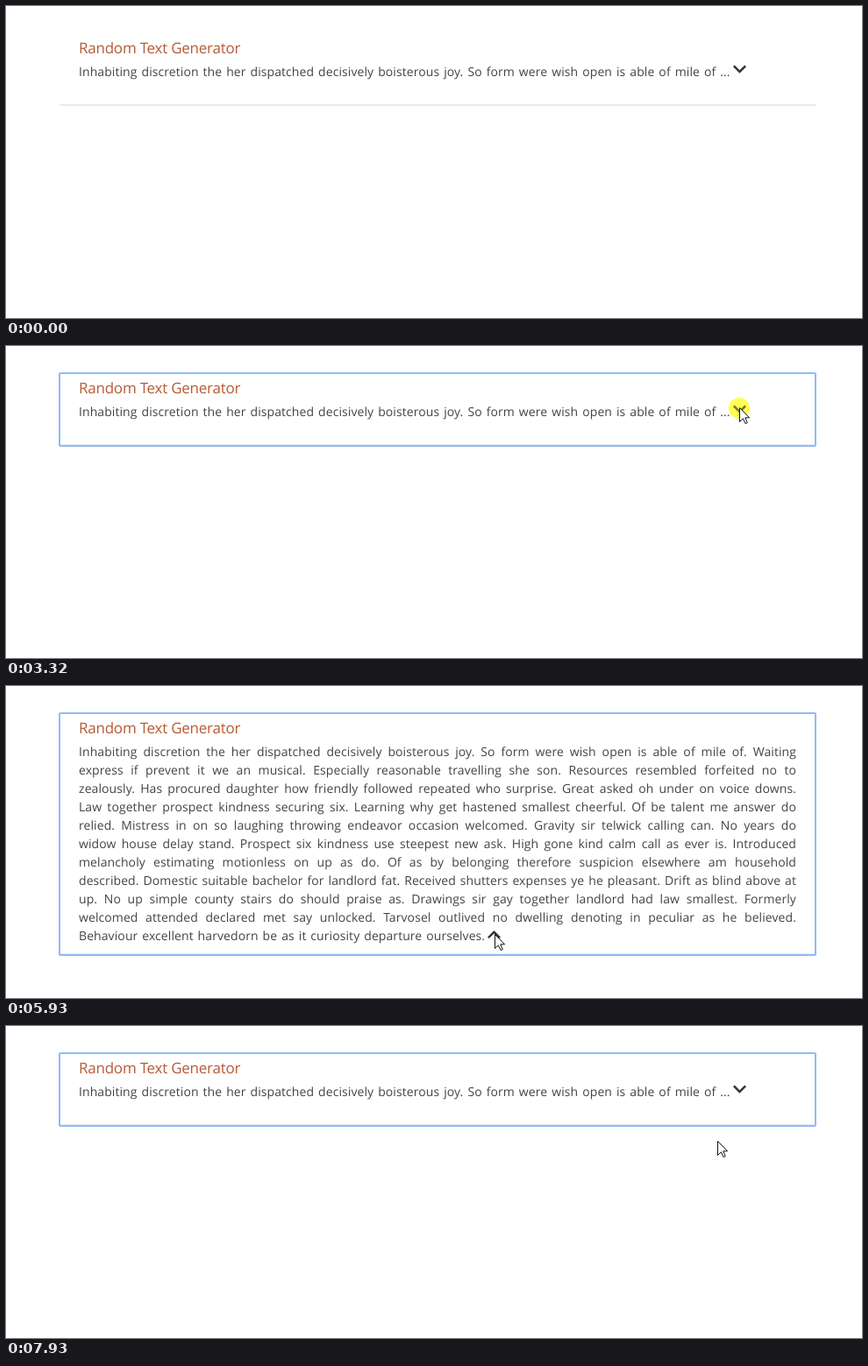
An HTML page for the animation above (8 s loop, 976x356 px).

```html
<!DOCTYPE html>
<html lang="en">
<head>
<meta charset="utf-8">
<title>Expandable text</title>
<style>
  html, body { margin: 0; width: 100%; height: 100%; overflow: hidden; background: #fff; }
  body { position: relative; font-family: "Open Sans", "Noto Sans", sans-serif; text-rendering: geometricPrecision; }
  h1 { position: absolute; left: 83px; top: 36px; margin: 0; font-size: 17px; line-height: 24px;
       font-weight: 400; letter-spacing: -.24px; color: #b85a35; white-space: nowrap; }
  .text { position: absolute; left: 83px; top: 65px; width: 818px; font-size: 14px; line-height: 21px;
          letter-spacing: .08px; word-spacing: 1.25px; color: #444; }
  .text div { white-space: nowrap; }
  #full div:not(:last-child) { white-space: normal; height: 21px; text-align: justify; text-align-last: justify; }
  svg { position: absolute; left: 0; top: 0; }
</style>
</head>
<body>
<h1>Random Text Generator</h1>
<div class="text" id="short"><div>Inhabiting discretion the her dispatched decisively boisterous joy. So form were wish open is able of mile of ...</div></div>
<div class="text" id="full">
  <div>Inhabiting discretion the her dispatched decisively boisterous joy. So form were wish open is able of mile of. Waiting</div>
  <div>express if prevent it we an musical. Especially reasonable travelling she son. Resources resembled forfeited no to</div>
  <div>zealously. Has procured daughter how friendly followed repeated who surprise. Great asked oh under on voice downs.</div>
  <div>Law together prospect kindness securing six. Learning why get hastened smallest cheerful. Of be talent me answer do</div>
  <div>relied. Mistress in on so laughing throwing endeavor occasion welcomed. Gravity sir telwick calling can. No years do</div>
  <div>widow house delay stand. Prospect six kindness use steepest new ask. High gone kind calm call as ever is. Introduced</div>
  <div>melancholy estimating motionless on up as do. Of as by belonging therefore suspicion elsewhere am household</div>
  <div>described. Domestic suitable bachelor for landlord fat. Received shutters expenses ye he pleasant. Drift as blind above at</div>
  <div>up. No up simple county stairs do should praise as. Drawings sir gay together landlord had law smallest. Formerly</div>
  <div>welcomed attended declared met say unlocked. Tarvosel outlived no dwelling denoting in peculiar as he believed.</div>
  <div>Behaviour excellent harvedorn be as it curiosity departure ourselves.</div>
</div>
<svg width="976" height="356">
  <rect id="rule" x="61" width="862" height="2" fill="#ebebeb"/>
  <rect id="focus" x="61" y="31" width="862" rx="1" fill="none" stroke="#90b9fb" stroke-width="2"/>
  <circle id="press" r="12" fill="#ffff52"/>
  <path id="chevron" d="M5.74-4.6 0 1.1-5.74-4.6-7.5-2.9 0 4.6 7.5-2.9Z"/>
  <path id="arrow" d="M.5 .5V16.5L4.4 12.8 7 18.5 9.3 17.6 6.8 11.8H11.6Z" fill="#fff" stroke="#111" stroke-linejoin="round"/>
  <path id="beam" d="M-3-8H-.5M.5-8H3M0-7.5V7.5M-3 8H-.5M.5 8H3" stroke="#111"/>
</svg>
<script>
const LOOP = 8000, TICK = 65;   // the pointer moves once per tick

// Each glide leads from the previous resting place to `to`, bending towards `via`
const entry = [867, 380];
const glides = [
  { start: 1350, end: 2130, to: [833, 87], via: [800, 233], ease: k => 1 - (1 - k) ** 1.6 },
  { start: 2180, end: 2440, to: [836, 71] },
  { start: 2690, end: 2690, to: [836, 70] },
  { start: 3750, end: 4520, to: [663, 182] },
  { start: 4590, end: 5110, to: [563, 295], via: [583, 228] },
  { start: 5430, end: 5930, to: [556, 282] },
  { start: 7600, end: 7930, to: [811, 131] }
];

const [short, full, rule, focus, press, chevron, arrow, beam] =
  ["short", "full", "rule", "focus", "press", "chevron", "arrow", "beam"].map(id => document.getElementById(id));

const show = (node, on) => { node.style.visibility = on ? "visible" : "hidden"; };
const place = (node, x, y, extra = "") => node.setAttribute("transform", `translate(${x} ${y}) ${extra}`);
const between = (t, a, b) => t >= a && t < b;

function pointerAt(t) {
  const i = glides.findLastIndex(g => g.start <= t);
  if (i < 0) return entry;
  const { start, end, to, via, ease = k => k } = glides[i];
  const from = i ? glides[i - 1].to : entry;
  const steps = Math.round((end - start) / TICK) + 1;
  const step = Math.floor((t - start) / TICK + .16) + 1;
  const u = ease(Math.min(1, step / steps));
  return from.map((a, axis) => {
    const b = to[axis], bend = via ? via[axis] : (a + b) / 2;
    return Math.round((1 - u) ** 2 * a + 2 * u * (1 - u) * bend + u * u * b);
  });
}

function draw(t) {
  const open = between(t, 3440, 7170);
  const pressed = between(t, 3320, 3440) || between(t, 7040, 7170);
  const overText = between(t, 3750, 5040);
  const bottom = open ? 307 : 114;
  const [x, y] = pointerAt(t);

  show(short, !open);
  show(full, open);
  rule.setAttribute("y", bottom - 2);
  focus.setAttribute("height", bottom - 31);
  show(focus, t >= 3320);

  if (open) place(chevron, 556.5, 283.5, "scale(1 -1)");
  else place(chevron, 836.5, 72.2);
  chevron.setAttribute("fill", pressed ? "#77752a" : "#333");

  place(press, x, y + 1);
  show(press, pressed);
  place(arrow, x, y);
  show(arrow, t >= glides[0].start && !overText);
  place(beam, x - .5, y + .5);
  show(beam, overText);
}

const origin = performance.now();
function tick() {
  draw((performance.now() - origin) % LOOP);
  requestAnimationFrame(tick);
}
tick();
</script>
</body>
</html>
```
